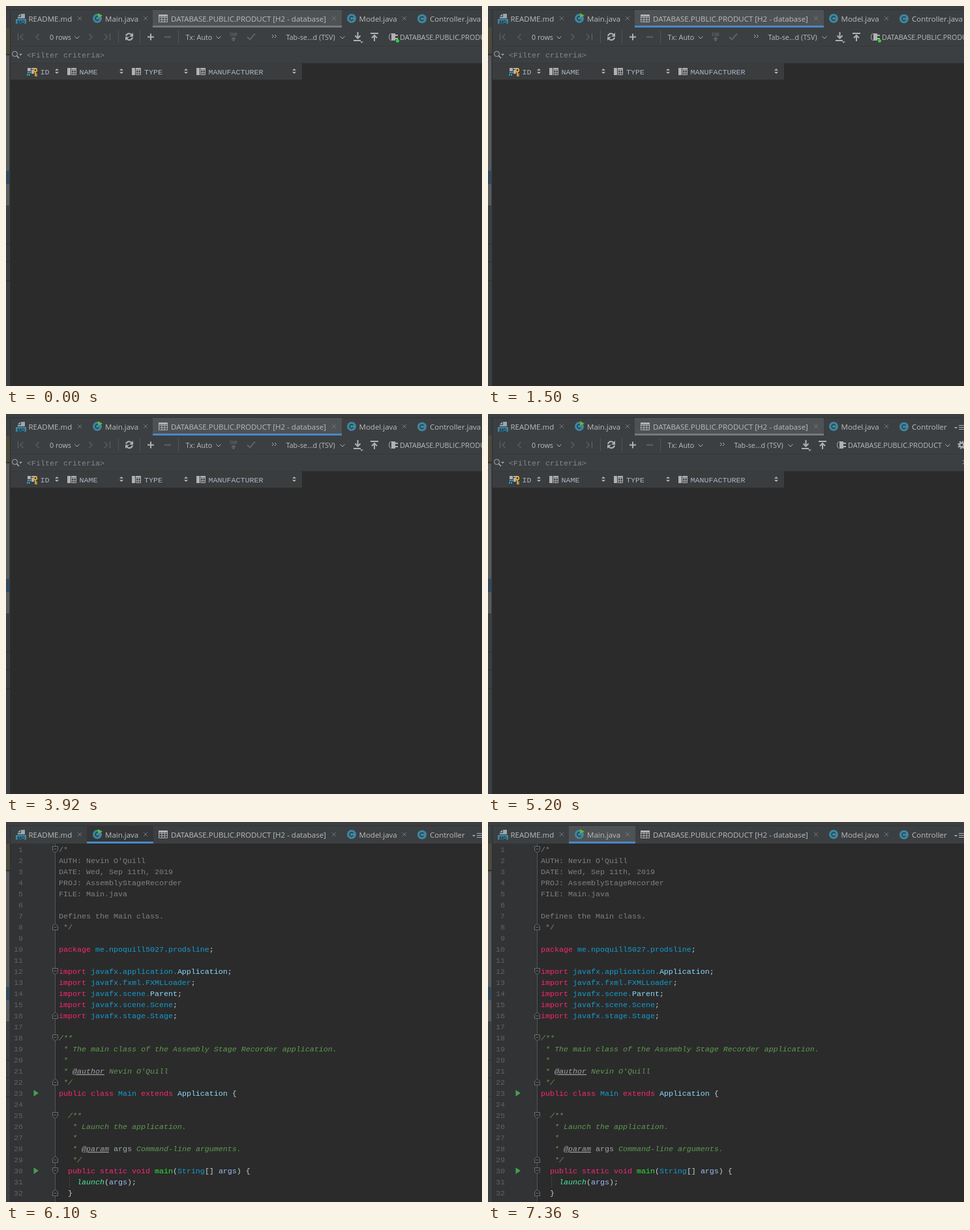
Recreate the animation shown at these times as an HTML page. Size 730 px wide and 583 px high, loop 8 s.

```html
<!DOCTYPE html>
<html lang="en">
<head>
<meta charset="utf-8">
<title>Editor tabs</title>
<style>
html, body { margin: 0; width: 100%; height: 100%; overflow: hidden; background: #2b2b2b; }
svg { display: block; width: 730px; height: 583px; }
text { white-space: pre; }
.ui { font: 11.5px "Open Sans", "Noto Sans", sans-serif; fill: #bbbbbb; }
.bar { font: 10.8px "Open Sans", "Noto Sans", sans-serif; fill: #bbbbbb; }
.mono { font: 11.667px "Liberation Mono", "DejaVu Sans Mono", monospace; fill: #a9b7c6; }
.line { fill: none; stroke: #afb1b3; }
.dim { fill: none; stroke: #5f6264; }
.num { fill: #606366; text-anchor: end; }
.c { fill: #808080; }
.k { fill: #f92672; }
.b { fill: #149bd0; }
.p { fill: #8cdaf8; }
.w { fill: #c5ced6; }
.d { fill: #5f9a52; font-style: italic; }
.t { fill: #a0a3a2; font-style: italic; text-decoration: underline; }
.a { fill: #9ea8ae; }
.m { fill: #2fe03c; }
.l { fill: #4ce8a0; font-style: italic; }
.v { fill: #9dbdf2; }
</style>
</head>
<body>
<svg viewBox="0 0 730 583" xmlns="http://www.w3.org/2000/svg">
  <defs>
    <g id="close"><path d="M-3-3L3 3M3-3L-3 3" stroke="#74777a" fill="none"/></g>
    <path id="chev" d="M-3.5-1.5L0 2L3.5-1.5" class="line"/>
    <g id="cls">
      <circle r="7" fill="#3e86a0"/>
      <path d="M2.5-1.7A3 3 0 1 0 2.5 1.7" fill="none" stroke="#233a43" stroke-width="1.4"/>
    </g>
    <g id="grid">
      <path d="M.5.5H13.5V11.5H.5ZM.5 4.5H13.5M.5 8H13.5M5 .5V11.5M9.3 .5V11.5" class="line"/>
      <path d="M0 0H14V3H0Z" fill="#afb1b3"/>
    </g>
    <g id="col">
      <path d="M0 0H5V11H0Z" fill="#afb1b3"/>
      <path d="M6.5.5H13.5V10.5H6.5ZM6.5 4H13.5M6.5 7.5H13.5M10 .5V10.5" class="line"/>
      <path d="M6 0H14V2.5H6Z" fill="#afb1b3"/>
    </g>
    <path id="sort" d="M-3-1L0-4L3-1ZM-3 1L0 4L3 1Z" fill="#afb1b3"/>
    <path id="run" d="M-3.5-5L4 0L-3.5 5Z" fill="#499c54"/>
    <path id="fold" d="M-4-4.5H4V1.5L0 5L-4 1.5ZM-2-.5H2" fill="#2b2b2b" stroke="#6b6d6f"/>
    <path id="foldEnd" d="M-4 4.5H4V-1.5L0-5L-4-1.5ZM-2 .5H2" fill="#2b2b2b" stroke="#6b6d6f"/>
    <g id="tail">
      <path d="M408 44l2.5 2.5l-2.5 2.5M412 44l2.5 2.5l-2.5 2.5" class="line"/>
      <text x="429.500" y="52" class="bar">Tab-se...d (TSV)</text>
      <use href="#chev" x="516" y="48"/>
      <path d="M539.500 40V49M535.500 45.500L539.500 49.500L543.500 45.500M533 53H544" class="line" stroke-width="2"/>
      <path d="M543 54.500H548L545.500 57Z" fill="#afb1b3"/>
      <path d="M559 42H571M565 54V45.500M561 49L565 45L569 49" class="line" stroke-width="2"/>
      <path d="M590.500 42Q587.500 43 587.500 47.500T590.500 53" class="line"/>
      <path d="M591 42H597V53H591ZM597 44H601V46H597ZM597 49H601V51H597Z" fill="#afb1b3"/>
      <text x="604" y="52" class="bar">DATABASE.PUBLIC.PRODUCT</text>
      <use href="#chev" x="757" y="48"/>
      <circle cx="778.500" cy="47.500" r="3.300" class="line" stroke-width="2.500"/>
      <circle cx="778.500" cy="47.500" r="5.300" class="line" stroke-width="2" stroke-dasharray="2.100 2.060"/>
    </g>
  </defs>

  <!-- window frame and side strip -->
  <path d="M0 0H730V33H0Z" fill="#3c3f41"/>
  <path d="M0 33H7V583H0Z" fill="#3c3f41"/>
  <path d="M0 5H730V6H0Z" fill="#323435"/>
  <path d="M0 33H6V73H0Z" fill="#4d493d"/>
  <path d="M0 76H5V306H0Z" fill="#595b5d"/>
  <path d="M0 253H5V273H0Z" fill="#30495f"/>
  <path d="M0 74.500H6M0 365.500H6M0 392.500H6M0 421.500H6M6.500 6V583" stroke="#2d2f30" fill="none"/>

  <!-- tabs -->
  <path data-on="0-6100" d="M225 6H515V30H225Z" fill="#4e5254"/>
  <path data-on="0-1500 5200-6100" d="M225 30H515V33H225Z" fill="#747a80"/>
  <path data-on="1500-5200" d="M225 30H515V33H225Z" fill="#4a88c7"/>
  <path data-on="5800-6100" d="M124 6H225V32H124Z" fill="#27292a"/>
  <path data-on="6100-6400" d="M124 6H226V30H124Z" fill="#333537"/>
  <path data-on="6400-8000" d="M124 6H226V30H124Z" fill="#4e5254"/>
  <path data-on="6100-8000" d="M124 30H226V33H124Z" fill="#4a88c7"/>

  <path d="M23 12H29V19H18V17H23ZM18 16L22 12V16Z" fill="#9aa7b0"/>
  <path d="M15 20H31V27H15Z" fill="#3c87a5"/>
  <text x="23" y="26.500" text-anchor="middle" style="font:bold 7.500px 'Liberation Sans',sans-serif" fill="#20333b">MD</text>
  <use href="#cls" x="140" y="19"/>
  <path d="M141 11L148 14.500L141 18Z" fill="#62b543"/>
  <use href="#grid" x="234" y="13"/>
  <use href="#cls" x="530" y="19"/>
  <use href="#cls" x="638" y="19.500"/>
  <g class="ui">
    <text x="34.500" y="24">README.md</text>
    <text x="152" y="24">Main.java</text>
    <text x="253" y="24">DATABASE.PUBLIC.PRODUCT [H2 - database]</text>
    <text x="541.500" y="24">Model.java</text>
    <text x="650" y="24" data-on="0-5200">Controller.java</text>
    <text x="650" y="24" data-on="5200-8000">Controller</text>
  </g>
  <use href="#close" x="113" y="19"/>
  <use href="#close" x="214" y="19"/>
  <use href="#close" x="503" y="19"/>
  <use href="#close" x="611" y="19"/>
  <g data-on="5200-8000">
    <path d="M715 20H720L717.500 22.500Z" fill="#afb1b3"/>
    <path d="M722 17.500H730M722 20.500H730M722 23.500H730" class="line"/>
  </g>

  <!-- table page -->
  <g data-on="0-6100">
    <path d="M7 33H730V88H7Z" fill="#3c3f41"/>
    <path d="M7 61.500H730M7 87.500H730" stroke="#353738"/>
    <path d="M7 88H454V113H7Z" fill="#3a3c3e"/>

    <path d="M18.500 42V53M26.500 43L22 47.500L26.500 52M50.500 43L46 47.500L50.500 52M127.500 43L132 47.500L127.500 52M151 43L155.500 47.500L151 52M159.500 42V53" class="dim" stroke-width="1.200"/>
    <text x="67" y="52" class="bar">0 rows</text>
    <use href="#chev" x="109" y="48"/>
    <path d="M172.500 37V57M205.500 37V57M264.500 37V57" stroke="#515355"/>
    <path d="M184 46A5 5 0 0 1 193 44.500M194 48A5 5 0 0 1 185 50" class="line" stroke-width="2"/>
    <path d="M195 41V47H189ZM183 53V47.500H189Z" fill="#afb1b3"/>
    <path d="M217 47.500H227M222 42.500V52.500" class="line" stroke-width="2"/>
    <path d="M243 47.500H253" class="dim" stroke-width="2"/>
    <text x="275.500" y="52" class="bar">Tx: Auto</text>
    <use href="#chev" x="326" y="48"/>
    <g data-on="0-5200">
      <text x="349" y="46" text-anchor="middle" style="font:bold 8px 'Liberation Sans',sans-serif" fill="#5f6264">DB</text>
      <path d="M345 51L349 47L353 51H350.500V54H347.500V51Z" fill="#5f6264"/>
      <path d="M370 47.500L374 51.500L382 42.500" class="dim" stroke-width="2"/>
    </g>
    <use href="#tail" data-on="0-5200"/>
    <use href="#tail" x="-52" data-on="5200-6100"/>
    <circle data-on="0-2000" cx="600.500" cy="53.500" r="2.500" fill="#1fe02e"/>

    <circle cx="13.500" cy="73.500" r="4" class="line"/>
    <path d="M16.500 76.500L20 80" class="line" stroke-width="1.500"/>
    <path d="M20 73.500H25L22.500 76Z" fill="#afb1b3"/>
    <text x="32" y="79" class="mono" style="fill:#85888a">&lt;Filter criteria></text>
    <path data-on="5200-6100" d="M728 71L731 74M728 77L731 74" class="line"/>

    <path d="M33 95H38V100H33ZM39 95H47V97H39ZM39 98H43V104H39Z" fill="#afb1b3"/>
    <path d="M33 102H38M32 105.500H38" stroke="#40b6e0" stroke-width="2" stroke-dasharray="2 1"/>
    <circle cx="45" cy="98.500" r="2.300" fill="none" stroke="#e8ae3c" stroke-width="1.800"/>
    <path d="M45 101V108M45 104.500H48M45 107H48" stroke="#e8ae3c" stroke-width="1.600"/>
    <use href="#col" x="94" y="95"/>
    <use href="#col" x="193" y="95"/>
    <use href="#col" x="292" y="95"/>
    <g class="mono">
      <text x="52.500" y="105">ID</text>
      <text x="112.500" y="105">NAME</text>
      <text x="212" y="105">TYPE</text>
      <text x="310.500" y="105">MANUFACTURER</text>
    </g>
    <use href="#sort" x="78" y="100"/>
    <use href="#sort" x="177" y="100"/>
    <use href="#sort" x="276" y="100"/>
    <use href="#sort" x="442" y="100"/>
  </g>

  <!-- code page -->
  <g data-on="6100-8000">
    <path d="M7 33H75V583H7Z" fill="#313335"/>
    <path d="M75.500 33V583" stroke="#515355"/>
    <path d="M97.500 543V561" stroke="#3b3d3e"/>
    <g id="code" class="mono"></g>
  </g>
</svg>
<script>
// Each "~x" switches the style of the text that follows it.
const source = `~c/*
~cAUTH: Nevin O'Quill
~cDATE: Wed, Sep 11th, 2019
~cPROJ: AssemblyStageRecorder
~cFILE: Main.java

~cDefines the Main class.
~c */

~kpackage ~bme.npoquill5027.prodsline~w;

~kimport ~bjavafx.application.~pApplication~w;
~kimport ~bjavafx.fxml.FXMLLoader~w;
~kimport ~bjavafx.scene.~pParent~w;
~kimport ~bjavafx.scene.Scene~w;
~kimport ~bjavafx.stage.Stage~w;

~d/**
~d * The main class of the Assembly Stage Recorder application.
~d *
~d * ~t@author~d Nevin O'Quill
~d */
~kpublic class ~bMain ~kextends ~pApplication ~w{

~d  /**
~d   * Launch the application.
~d   *
~d   * ~t@param~a args~d Command-line arguments.
~d   */
~k  public static void ~mmain~w(~bString~w[] ~vargs~w) {
~l    launch~w(~vargs~w);
~w  }`;
const marks = { fold: [1, 12, 18, 25, 30], foldEnd: [8, 16, 22, 29, 32], run: [23, 30] };

const code = document.getElementById('code');
function add(parent, name, attrs, text) {
  const el = document.createElementNS('http://www.w3.org/2000/svg', name);
  for (const key in attrs) el.setAttribute(key, attrs[key]);
  if (text) el.textContent = text;
  return parent.appendChild(el);
}

source.split('\n').forEach((row, i) => {
  const y = 46 + 17 * i;
  add(code, 'text', { x: 26, y, class: 'num' }, String(i + 1));
  const line = add(code, 'text', { x: 81, y });
  for (const part of row.split('~').slice(1))
    add(line, 'tspan', { class: part[0] }, part.slice(1));
});
for (const id in marks)
  for (const n of marks[id])
    add(code, 'use', { href: '#' + id, x: id === 'run' ? 46 : 75.5, y: 25 + 17 * n });

const layers = [...document.querySelectorAll('[data-on]')].map(el => ({
  el, spans: el.dataset.on.split(' ').map(s => s.split('-').map(Number))
}));

function draw() {
  const t = performance.now() % 8000;
  for (const { el, spans } of layers)
    el.style.display = spans.some(([from, to]) => t >= from && t < to) ? '' : 'none';
  requestAnimationFrame(draw);
}
draw();
</script>
</body>
</html>
```
